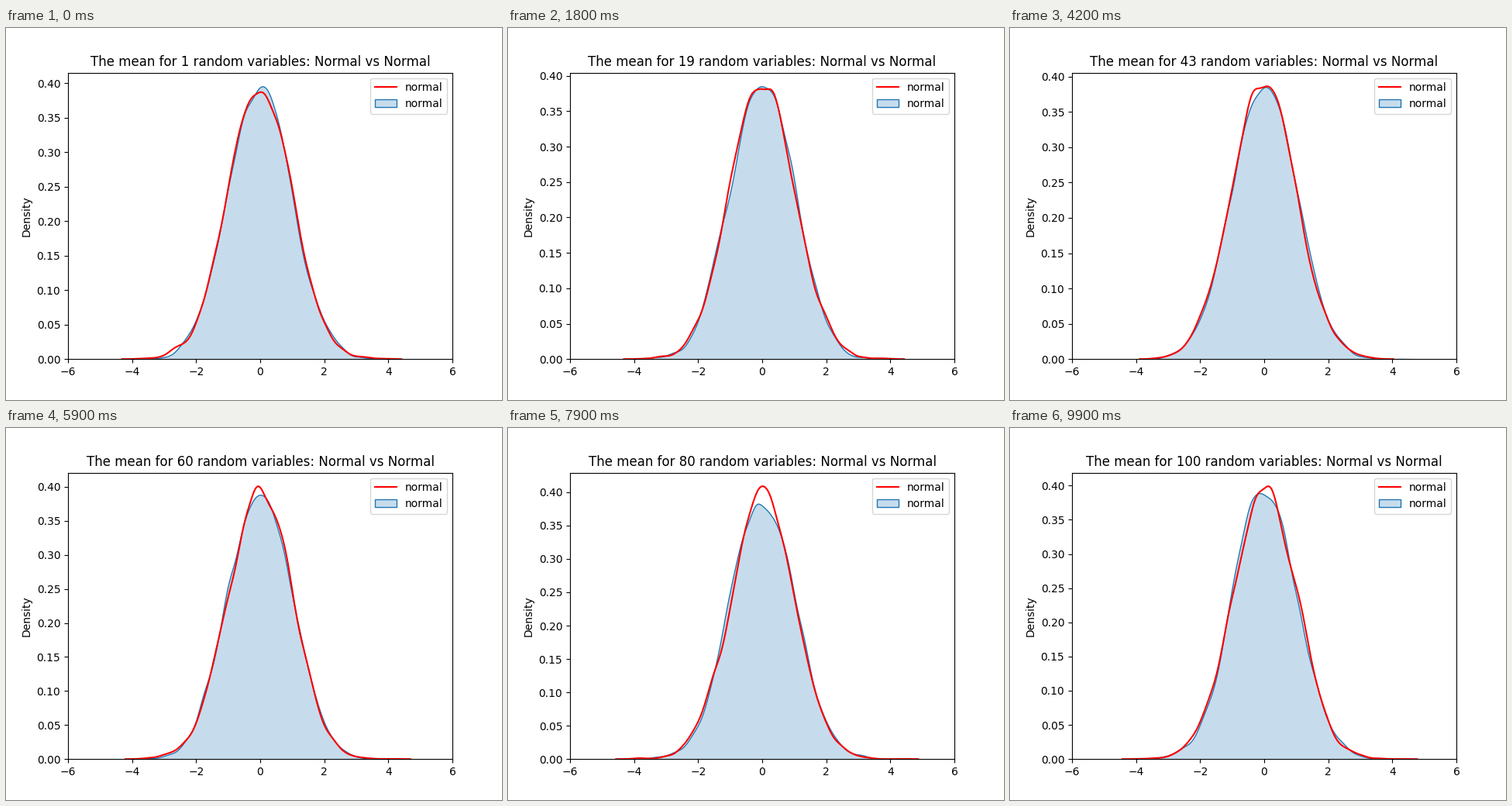
These frames come from a looping animation (640 by 480 pixels, 10 s). A matplotlib script:

```python
import numpy as np
import matplotlib.pyplot as plt
from matplotlib.animation import FuncAnimation

STEPS = 100
SAMPLES = 10000
BLUE = "#1f77b4"


def kde(data, points=200, cut=3):
    """Gaussian density estimate with Scott's bandwidth, from fine bins."""
    h = data.std(ddof=1) * len(data) ** -0.2
    x = np.linspace(data.min() - cut * h, data.max() + cut * h, points)
    counts, edges = np.histogram(data, bins=800)
    mids = (edges[1:] + edges[:-1]) / 2
    bells = np.exp(-0.5 * ((x[:, None] - mids) / h) ** 2)
    return x, bells @ counts / (len(data) * h * np.sqrt(2 * np.pi))


fig, ax = plt.subplots(figsize=(6.4, 4.8), dpi=100)


def draw(i):
    n = i + 1
    rng = np.random.default_rng(n)
    # The scaled mean of n standard normals is again standard normal.
    (mean_x, mean_y), (ref_x, ref_y) = (
        kde(rng.standard_normal(SAMPLES)) for _ in range(2))

    ax.clear()
    mean_line, = ax.plot(mean_x, mean_y, color="red", linewidth=1.5)
    ref_area = ax.fill_between(ref_x, ref_y, facecolor=(BLUE, 0.25),
                               edgecolor=BLUE, linewidth=1)
    ax.set_xlim(-6, 6)
    ax.set_ylim(0, 1.05 * max(mean_y.max(), ref_y.max()))
    ax.set_ylabel("Density")
    ax.set_title(f"The mean for {n} random variables: Normal vs Normal")
    ax.legend([mean_line, ref_area], ["normal", "normal"], loc="upper right")


anim = FuncAnimation(fig, draw, frames=STEPS, interval=100,
                     init_func=lambda: None, repeat=True, repeat_delay=0)
plt.show()
```
